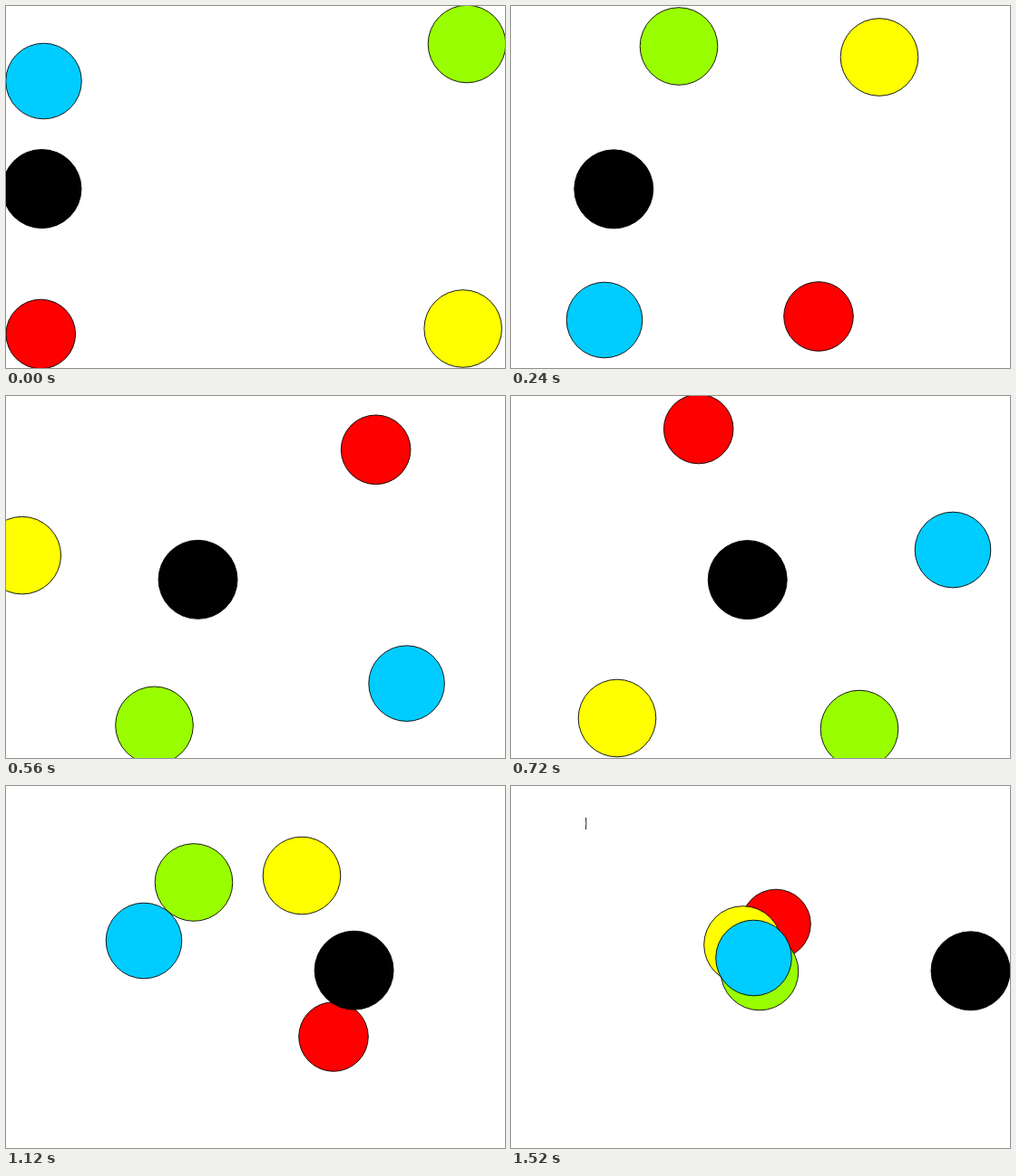
Recreate the animation shown at these times as an HTML page. Size 550x400 px, loop 1.6 s.

```html
<!DOCTYPE html>
<html lang="en">
<head>
<meta charset="utf-8">
<title>Spiralling balls</title>
<style>
  html, body { margin: 0; width: 100%; height: 100%; overflow: hidden; background: #fff; }
  svg { display: block; width: 100vw; height: 100vh; }
</style>
</head>
<body>
<svg id="stage" viewBox="0 0 550 400" stroke="#000" stroke-width=".9">
  <path id="tick" d="M82.5 35q.8 6.5 0 13" fill="none"/>
</svg>
<script>
const STEP = 80, COUNT = 20;
const CX = 270, CY = 200, RX = 275, RY = 200, TAU = Math.PI * 2;

// Every ball passes its key points at these steps.
const KEYS = [0, 3, 5, 9, 11, 14, 19];
const spirals = [
  { fill: '#f00', r: 38.3, path: [[38.3, 362.5], [339, 343], [492, 230],
    [206.7, 36.5], [106, 198.5], [361, 277], [292, 152.5]] },
  { fill: '#9f0', r: 42.8, path: [[508, 42], [185, 44.5], [44, 189.5],
    [384, 368], [474, 201], [207, 106.5], [274, 205]] },
  { fill: '#ff0', r: 42.8, path: [[503.7, 356.5], [406, 56.5], [180.5, 38],
    [117, 356], [343, 360], [326, 99], [255.5, 175.5]] },
  { fill: '#0cf', r: 41.8, path: [[41.5, 83], [103, 347], [292, 381],
    [487, 170], [355, 47], [152, 171], [267.5, 190]] }
];

// Elliptical polar form, anticlockwise; the last leg winds in by most of a turn or more.
function toPolar(path) {
  let last = Infinity;
  return path.map(([x, y], i) => {
    const u = (x - CX) / RX, v = (y - CY) / RY;
    const limit = last - (i === path.length - 1 ? TAU * 0.75 : 0);
    let a = Math.atan2(v, u);
    while (a > limit) a -= TAU;
    last = a;
    return { a, p: Math.hypot(u, v) };
  });
}

function slope(k, i) {
  const a = k[Math.max(i - 1, 0)], b = k[Math.min(i + 1, k.length - 1)];
  return (b.p - a.p) / (b.a - a.a);
}

// Hermite blend of the radius over the angle between two key points.
function pointOn(k, i, s) {
  const a = k[i], b = k[i + 1], d = b.a - a.a, q = 1 - s;
  const p = q * q * (1 + 2 * s) * a.p + s * s * (3 - 2 * s) * b.p
    + d * s * q * (q * slope(k, i) - s * slope(k, i + 1));
  const angle = a.a + d * s;
  return { x: CX + RX * p * Math.cos(angle), y: CY + RY * p * Math.sin(angle) };
}

// Even speed along each leg.
function trace(path) {
  const k = toPolar(path), out = [], N = 400;
  for (let i = 0; i < k.length - 1; i++) {
    const pts = [{ ...pointOn(k, i, 0), len: 0 }];
    for (let j = 1; j <= N; j++) {
      const o = pts[j - 1], p = pointOn(k, i, j / N);
      pts.push({ ...p, len: o.len + Math.hypot(p.x - o.x, p.y - o.y) });
    }
    const steps = KEYS[i + 1] - KEYS[i];
    for (let t = 0; t <= steps; t++) {
      const want = pts[N].len * t / steps;
      out[KEYS[i] + t] = pts.find(p => p.len >= want - 1e-6);
    }
  }
  return out;
}

const stage = document.getElementById('stage');
const tick = document.getElementById('tick');

function addBall(fill, r, at) {
  const el = document.createElementNS('http://www.w3.org/2000/svg', 'circle');
  el.setAttribute('fill', fill);
  el.setAttribute('r', r);
  stage.appendChild(el);
  return { el, at };
}

const balls = spirals.map(({ fill, r, path }) => {
  const spots = trace(path);
  return addBall(fill, r, n => spots[n]);
});
balls.push(addBall('#000', 43.5, n => ({ x: 39.5 + 24.58 * n, y: 202 + 0.122 * n })));

function draw(ms) {
  const n = Math.floor(ms / STEP) % COUNT;
  for (const { el, at } of balls) {
    const { x, y } = at(n);
    el.setAttribute('cx', x.toFixed(2));
    el.setAttribute('cy', y.toFixed(2));
  }
  tick.style.display = n === COUNT - 1 ? '' : 'none';
}

const start = performance.now();
function loop(now) {
  draw(Math.max(0, now - start));
  requestAnimationFrame(loop);
}
draw(0);
requestAnimationFrame(loop);
</script>
</body>
</html>
```
